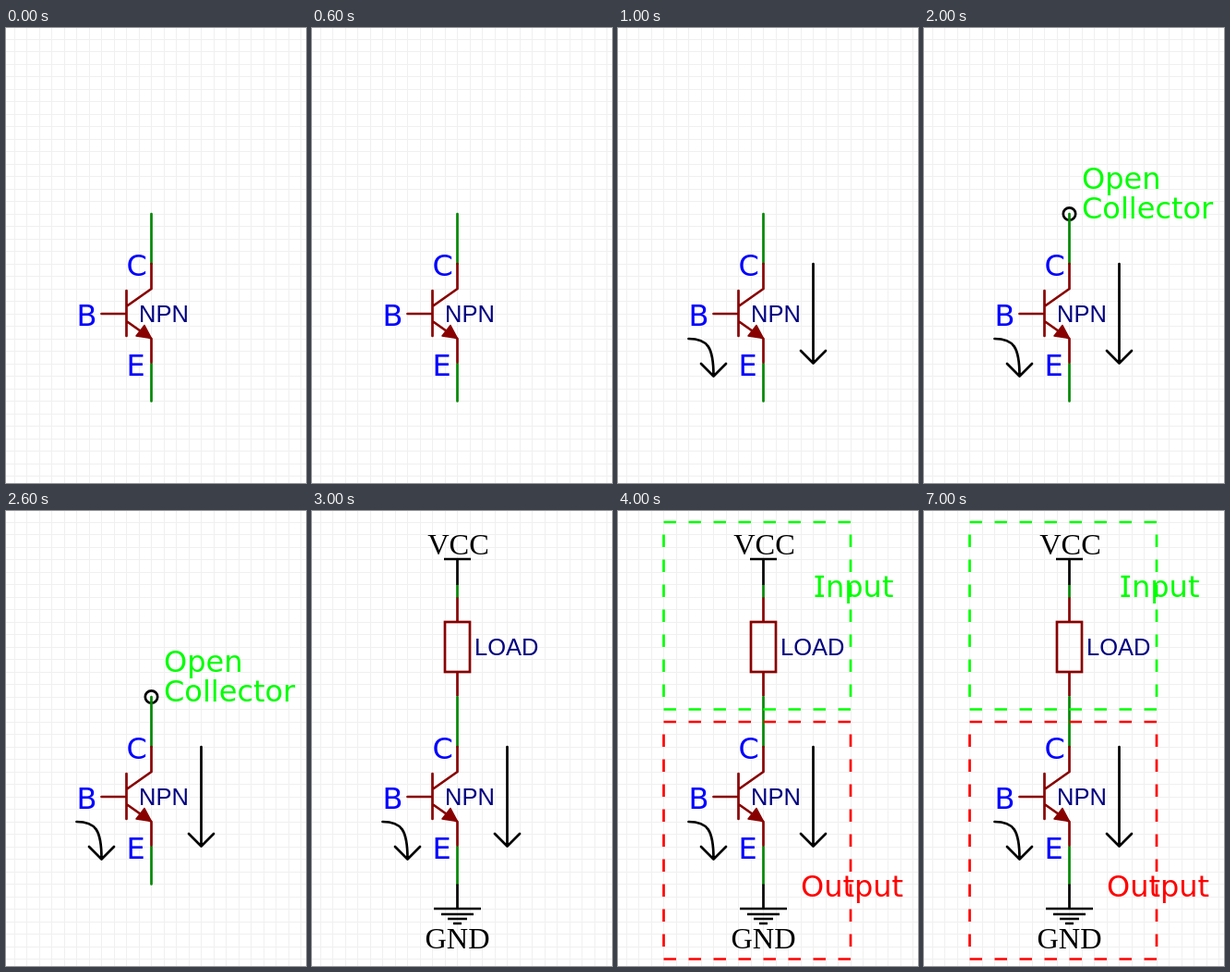
An HTML page for the animation above (9000 ms loop, 325x492 px).

```html
<!DOCTYPE html>
<html lang="en">
<head>
<meta charset="utf-8">
<title>Open collector output</title>
<style>
  html, body { margin: 0; width: 100%; height: 100%; overflow: hidden; background: #fff; }
  svg { display: block; width: 325px; height: 492px; }
  path, rect, circle { fill: none; stroke-width: 2.7; }
  text { stroke: none; }
  .grid { stroke: #f0f0f0; stroke-width: 1; shape-rendering: crispEdges; }
  .wire { stroke: #008800; }
  .part { stroke: #880000; }
  .ink { stroke: #000; }
  .round { stroke-linecap: round; stroke-linejoin: round; }
  .solid { fill: #880000; stroke-width: 1.5; }
  .dash { stroke-dasharray: 13.5; }
  .lime { stroke: #0f0; }
  .red { stroke: #f00; }
  .big { font: 32px "DejaVu Sans", sans-serif; }
  .pin { fill: #00f; }
  .name { font: 25.5px "Liberation Sans", sans-serif; fill: #000080; }
  .net { font: 32.4px "Liberation Serif", serif; text-anchor: middle; }
</style>
</head>
<body>
<svg viewBox="0 0 325 492">
  <path id="grid" class="grid"/>

  <g data-from="2000" data-to="3000">
    <circle class="ink" cx="157.5" cy="201" r="6.7"/>
    <g class="big" fill="#0f0">
      <text x="171" y="174">Open</text>
      <text x="171" y="206">Collector</text>
    </g>
  </g>

  <g class="round">
    <path class="wire" d="M157.5 201V255M157.5 363V403.5"/>
    <path class="part" d="M157.5 255V282L130.5 301M130.5 284V333M103.5 309H130.5M130.5 317L157.5 336V361.5"/>
    <path class="part solid" d="M157.5 335.5L150 321.5L141 333Z"/>
  </g>
  <g class="big pin">
    <text x="76.5" y="322">B</text>
    <text x="130.5" y="268">C</text>
    <text x="130.5" y="376">E</text>
  </g>
  <text class="name" x="144" y="318">NPN</text>

  <path class="ink round" data-from="1000"
    d="M76.5 336C97 336 103.5 345 103.5 376M90 363L103.5 376.5L117 363M211.5 255V362M198 349L211.5 362.5L225 349"/>

  <g data-from="3000">
    <path class="wire" d="M157.5 80V94"/>
    <path class="part" d="M157.5 93.5V120M157.5 174V200"/>
    <rect class="part" x="144" y="120" width="27" height="54"/>
    <path class="ink" d="M143 52H172M157.5 52V80M157.5 403.5V430M132 430H183M140 436H175M147 441H168M153 446H162"/>
    <text class="name" x="176" y="156">LOAD</text>
    <text class="net" x="158.5" y="47">VCC</text>
    <text class="net" x="157.5" y="473">GND</text>
  </g>

  <g data-from="4000">
    <rect class="dash lime" x="49.5" y="12" width="202.5" height="202.5"/>
    <rect class="dash red" x="49.5" y="228" width="202.5" height="256.5"/>
    <g class="big">
      <text x="213.5" y="93" fill="#0f0">I<tspan x="225">nput</tspan></text>
      <path class="lime" d="M213.5 71H223M213.5 91.7H223" style="stroke-width:2.4"/>
      <text x="198" y="417" fill="#f00">Output</text>
    </g>
  </g>
</svg>
<script>
  const LOOP = 9000, STEP = 13.5;
  const steps = [...document.querySelectorAll("[data-from]")];

  let lines = "";
  for (let x = 9; x < 325; x += STEP) lines += `M${Math.floor(x) + .5} 0V492`;
  for (let y = 12; y < 492; y += STEP) lines += `M0 ${Math.floor(y) + .5}H325`;
  document.getElementById("grid").setAttribute("d", lines);

  function draw() {
    const t = performance.now() % LOOP;
    for (const el of steps) {
      const { from, to = LOOP } = el.dataset;
      el.style.display = t >= +from && t < +to ? "" : "none";
    }
    requestAnimationFrame(draw);
  }
  draw();
</script>
</body>
</html>
```
